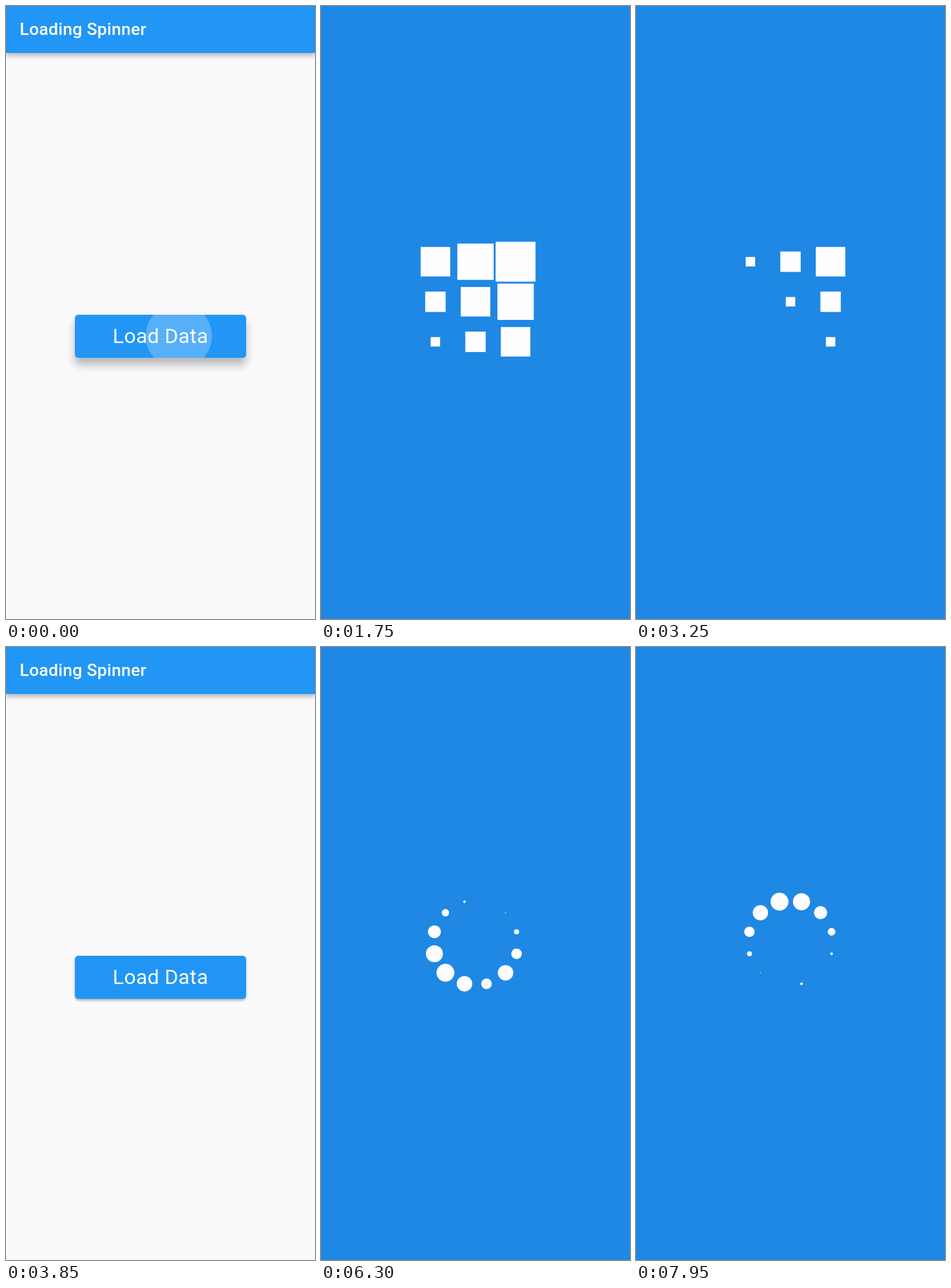
Animation, 480 px wide and 953 px high, one loop 8000 ms. Source, as an HTML page:

```html
<!DOCTYPE html>
<html lang="en">
<head>
<meta charset="utf-8">
<title>Loading Spinner</title>
<style>
  html, body { margin: 0; width: 480px; height: 953px; overflow: hidden; }
  #page, #loader { position: absolute; left: 0; top: 0; width: 480px; height: 953px; }
  #page { background: #faf9fc; color: #fff; font-family: Roboto, sans-serif; overflow: hidden; }
  #loader { background: #1e88e4; fill: #fffdff; }
  header {
    box-sizing: border-box; height: 73px; padding-left: 21.3px;
    background: #2196f5; box-shadow: 0 5.3px 7px rgba(0, 0, 0, .27);
    font-size: 26.67px; font-weight: 500; line-height: 73px; letter-spacing: .2px;
  }
  #button {
    position: absolute; left: 106.7px; top: 480px; width: 266.6px; height: 66.6px;
    border-radius: 5.3px; overflow: hidden; background: #2196f5;
    font-size: 32px; line-height: 66.6px; letter-spacing: .35px; text-align: center;
  }
  #button span { position: relative; }
  #ripple { position: absolute; border-radius: 50%; background: rgba(255, 255, 255, .24); }
</style>
</head>
<body>
<div id="page">
  <header>Loading Spinner</header>
  <div id="button"><div id="ripple"></div><span>Load Data</span></div>
</div>
<svg id="loader" viewBox="0 0 480 953"><g id="grid"></g><g id="ring"></g></svg>
<script>
const LOOP = 8000, FRAME = 50, SIZE = 186.8, CX = 240, CY = 459.8;
const CELL = SIZE / 3, DOT = SIZE * 0.075, RADIUS = SIZE * Math.SQRT1_2 / 2;
const BUTTON = { w: 266.6, h: 66.6, left: 106.7 };

// Each press ends by opening a loader.
const PRESSES = [
  { start: -290, end: 750, x: 280 },
  { start: 5100, end: 5900, x: 300 }
];
const GRID = { start: 700, show: 750, hide: 3750, period: 2000 };
const RING = { start: 5863, show: 5900, hide: LOOP, period: 1175 };

const $ = id => document.getElementById(id);
const page = $('page'), button = $('button'), ripple = $('ripple');
const loader = $('loader'), grid = $('grid'), ring = $('ring');
const clamp = v => Math.min(1, Math.max(0, v));
const within = (t, span) => t >= span.show && t < span.hide;

function add(parent, tag, count) {
  return Array.from({ length: count }, () =>
    parent.appendChild(document.createElementNS('http://www.w3.org/2000/svg', tag)));
}
function set(node, attrs) {
  for (const key in attrs) node.setAttribute(key, attrs[key]);
}

const squares = add(grid, 'rect', 9);
const dots = add(ring, 'circle', 12);
dots.forEach((dot, i) => {
  const angle = (45 + 30 * i) * Math.PI / 180;
  set(dot, { cx: CX + RADIUS * Math.cos(angle), cy: CY + RADIUS * Math.sin(angle) });
});

// cubic-bezier(.42, 0, 1, 1)
function easeIn(x) {
  let lo = 0, hi = 1;
  for (let i = 0; i < 24; i++) {
    const s = (lo + hi) / 2, r = 1 - s;
    if (1.26 * r * r * s + 3 * r * s * s + s ** 3 < x) lo = s; else hi = s;
  }
  return lo * lo * (3 - 2 * lo);
}

function drawButton(t) {
  const press = PRESSES.find(p => t >= p.start && t < p.end);
  const age = press ? t - press.start : 0;
  const lift = 2 + 6 * (1 - (1 - clamp(age / 200)) ** 3);
  button.style.boxShadow = `0 ${lift * 1.33}px ${lift * 1.78}px rgba(0,0,0,.27)`;

  const grow = clamp(age / 1000);
  const touch = press ? press.x - BUTTON.left : 0;
  const r = grow * Math.hypot(Math.max(touch, BUTTON.w - touch), BUTTON.h / 2);
  const x = touch + (BUTTON.w / 2 - touch) * grow;
  Object.assign(ripple.style, {
    left: x - r + 'px', top: BUTTON.h / 2 - r + 'px',
    width: 2 * r + 'px', height: 2 * r + 'px'
  });
}

// Squares shrink along diagonals from the lower left, then grow back.
function drawGrid(t) {
  const phase = (t - GRID.start) / GRID.period % 2;
  const c = phase < 1 ? phase : 2 - phase;
  squares.forEach((square, i) => {
    const col = i % 3, row = Math.floor(i / 3);
    const begin = 0.1 * (1 + col + 2 - row);
    const side = CELL * (1 - easeIn(clamp((c - begin) / 0.5)));
    set(square, {
      x: CX + (col - 1) * CELL - side / 2, y: CY + (row - 1) * CELL - side / 2,
      width: side, height: side
    });
  });
}

function drawRing(t) {
  const phase = (t - RING.start) / RING.period;
  dots.forEach((dot, i) => {
    const lead = i ? (12 - i) / 10 : 0;
    set(dot, { r: DOT * (Math.sin((phase + lead) * 2 * Math.PI) + 1) / 2 });
  });
}

function draw() {
  const t = Math.floor(performance.now() % LOOP / FRAME) * FRAME;
  const showGrid = within(t, GRID), showRing = within(t, RING);
  const loading = showGrid || showRing;
  page.style.display = loading ? 'none' : 'block';
  loader.style.display = loading ? 'block' : 'none';
  grid.style.display = showGrid ? 'inline' : 'none';
  ring.style.display = showRing ? 'inline' : 'none';
  if (showGrid) drawGrid(t);
  else if (showRing) drawRing(t);
  else drawButton(t);
  requestAnimationFrame(draw);
}
draw();
</script>
</body>
</html>
```
